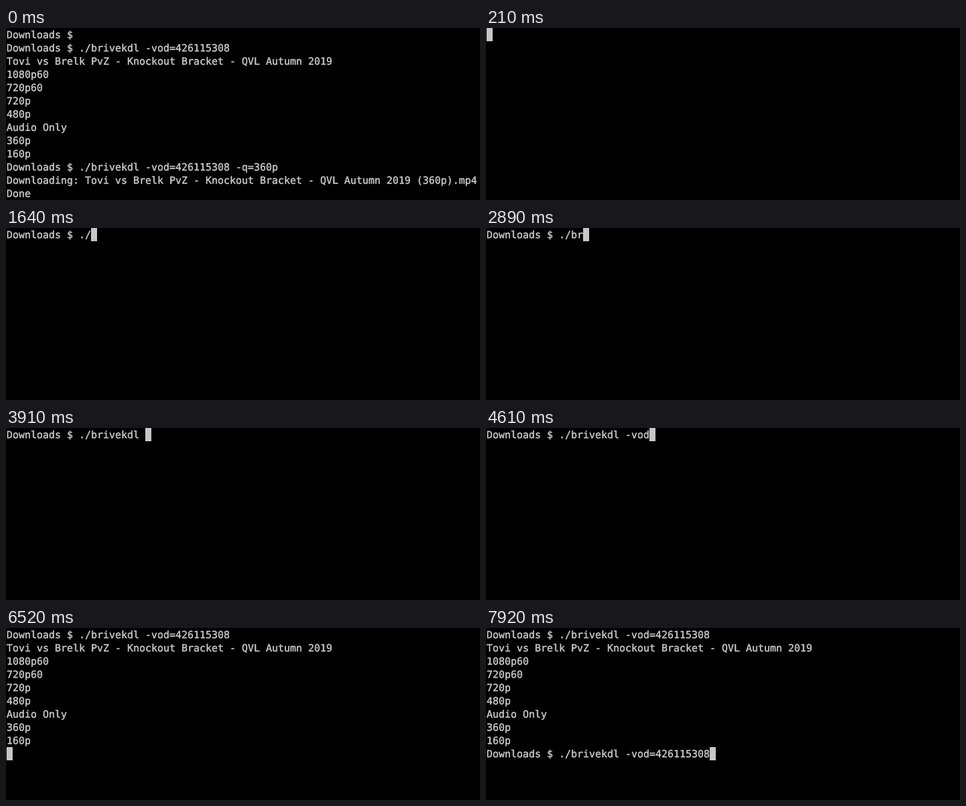
Recreate the animation shown at these times as an HTML page. Size 786 px wide and 286 px high, loop 8 s.

```html
<!DOCTYPE html>
<html lang="en">
<head>
<meta charset="utf-8">
<title>Terminal session</title>
<style>
  html, body { margin: 0; width: 100%; height: 100%; overflow: hidden; background: #000; }
  svg { display: block; width: 786px; height: 286px; background: #000; }
  text {
    font: 16.61px "DejaVu Sans Mono", "Noto Sans Mono", monospace;
    fill: #c7c7c7;
    stroke: #c7c7c7;
    stroke-width: 0.5px;
    white-space: pre;
    text-rendering: geometricPrecision;
  }
  #cursor { fill: #c7c7c7; }
</style>
</head>
<body>
<svg id="screen" viewBox="0 0 786 286"><rect id="cursor" width="10" height="22"/></svg>
<script>
const LOOP = 8000, COLS = 10, ROWS = 22, LEFT = 1, BASELINE = 17, ROW_COUNT = 13;

const prompt = "Downloads $ ";
const command = prompt + "./brivekdl -vod=426115308";
const title = "Tovi vs Brelk PvZ - Knockout Bracket - QVL Autumn 2019";
const listing = [command, title, "1080p60", "720p60", "720p", "480p", "Audio Only", "360p", "160p"];
const finished = [prompt, ...listing, command + " -q=360p", `Downloading: ${title} (360p).mp4`, "Done"];

// [time in ms, characters of the command line on screen]
const typing = [
  [210, 0], [630, 12], [1000, 13], [1640, 14], [2760, 15], [2890, 16], [3910, 23],
  [4160, 24], [4350, 26], [4610, 27], [5120, 35], [5490, 37]
];

// Every screen is a list of lines; the cursor follows the last one.
const screens = [
  { at: 0, lines: [...finished, ""] },
  ...typing.map(([at, count]) => ({ at, lines: [command.slice(0, count)] })),
  { at: 6520, lines: [...listing, ""] },
  { at: 7920, lines: [...listing, command] }
];

const svg = document.getElementById("screen");
const cursor = document.getElementById("cursor");
const rows = Array.from({ length: ROW_COUNT }, (_, i) => {
  const row = document.createElementNS("http://www.w3.org/2000/svg", "text");
  row.setAttribute("x", LEFT);
  row.setAttribute("y", i * ROWS + BASELINE);
  return svg.appendChild(row);
});

let shown = null;

function draw(time) {
  const screen = screens.findLast(s => s.at <= time);
  if (screen === shown) return;
  shown = screen;
  const { lines } = screen;
  rows.forEach((row, i) => { row.textContent = lines[i] || ""; });
  cursor.setAttribute("x", LEFT + lines.at(-1).length * COLS);
  cursor.setAttribute("y", (lines.length - 1) * ROWS);
}

const start = performance.now();

function tick() {
  draw((performance.now() - start) % LOOP);
  requestAnimationFrame(tick);
}

tick();
</script>
</body>
</html>
```
